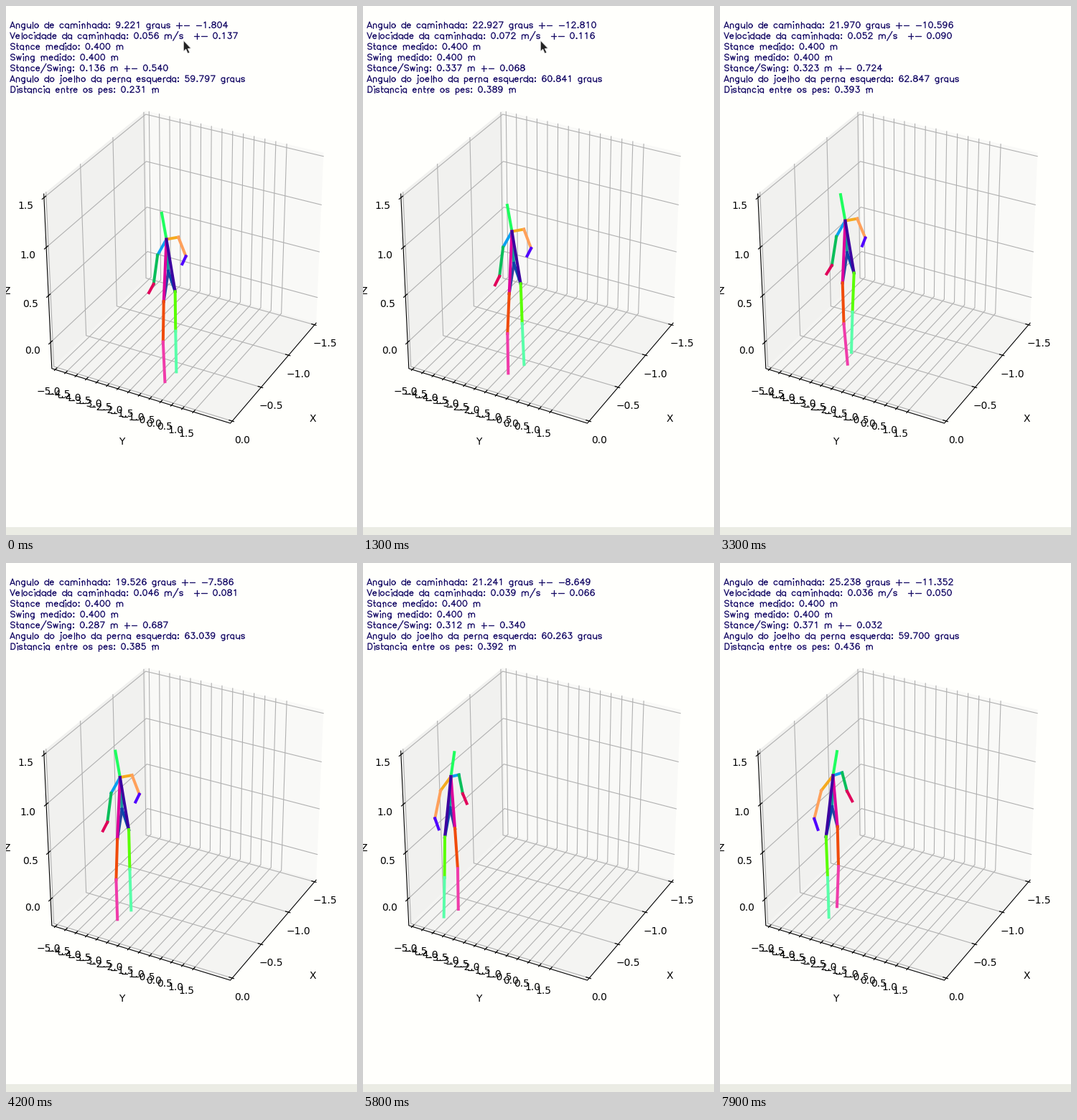
Write a matplotlib script that moves like this. It is 489x738 px and loops after 8 s.

```python
import numpy as np
import matplotlib.pyplot as plt
from matplotlib.animation import FuncAnimation
from matplotlib.collections import LineCollection
from matplotlib.patches import Polygon, Rectangle

W, H, DPI = 489, 738, 64
STEP = 100
COUNT = 80


def px(n):
    """Pixels to points."""
    return n * 72 / DPI


plt.rcParams["font.family"] = "DejaVu Sans"
fig = plt.figure(figsize=(W / DPI, H / DPI), dpi=DPI, facecolor="#fffffc")
ax = fig.add_axes([0, 0, 1, 1])
ax.set_xlim(-0.5, W - 0.5)
ax.set_ylim(H - 0.5, -0.5)
ax.axis("off")

# ---------------------------------------------------------------- 3D box
AZIM, ELEV, DIST = np.radians(27.7), np.radians(31), 9.5
CA, SA, CE, SE = np.cos(AZIM), np.sin(AZIM), np.cos(ELEV), np.sin(ELEV)
VIEW = np.array([[-SA, CA, 0], [-SE * CA, -SE * SA, CE], [CE * CA, CE * SA, SE]])
LOW = np.array([-1.5, -5, -0.25])
HIGH = np.array([0, 3, 1.5])
PAD = (HIGH - LOW) / 48
X0, Y0, Z0 = LOW - PAD
X1, Y1, Z1 = HIGH + PAD


def project(x, y, z):
    unit = (np.array([x, y, z]) - LOW) / (HIGH - LOW) - 0.5
    right, up, near = VIEW @ unit
    scale = 2557 / (DIST - near)
    return 251 + scale * right, 356 - scale * up


def path3(points, **style):
    ax.plot(*zip(*[project(*p) for p in points]), **style)


def label(x, y, text):
    ax.text(x, y + 5, text, fontsize=px(13.89), ha="center", va="baseline")


def pane(color, *corners):
    ax.add_patch(Polygon([project(*c) for c in corners], fc=color, ec="none"))


def ticks(values, grid, mark, offset):
    """Grid line, tick mark and label for each value of one axis."""
    for v in values:
        path3(grid(v), color="#b0b0b0", lw=px(1.1), zorder=2)
        path3(mark(v), color="black", lw=px(1.2), zorder=3)
        x, y = project(*mark(v)[1])
        label(x + offset[0], y + offset[1], f"{v:.1f}".replace("-", "\u2212"))


pane("#f1f1ef", (X0, Y0, Z0), (X1, Y0, Z0), (X1, Y0, Z1), (X0, Y0, Z1))
pane("#f9f9f7", (X0, Y0, Z0), (X0, Y1, Z0), (X0, Y1, Z1), (X0, Y0, Z1))
pane("#f4f4f2", (X0, Y0, Z0), (X1, Y0, Z0), (X1, Y1, Z0), (X0, Y1, Z0))

DX, DY = (X1 - X0) / 60, (Y1 - Y0) / 60
ticks(np.arange(-1.5, 0.1, 0.5),
      lambda v: [(v, Y0, Z1), (v, Y0, Z0), (v, Y1, Z0)],
      lambda v: [(v, Y1 - DY, Z0), (v, Y1, Z0), (v, Y1 + DY / 2, Z0)],
      (14, 25.5))
ticks(np.arange(-5, 1.6, 0.5),
      lambda v: [(X0, v, Z1), (X0, v, Z0), (X1, v, Z0)],
      lambda v: [(X1 - DX, v, Z0), (X1, v, Z0), (X1 + DX / 2, v, Z0)],
      (-9.5, 29.5))
ticks(np.arange(0, 1.6, 0.5),
      lambda v: [(X1, Y0, v), (X0, Y0, v), (X0, Y1, v)],
      lambda v: [(X1 - DX, Y0, v), (X1, Y0, v), (X1 + DX, Y0, v)],
      (-25.5, 10.5))
path3([(X1, Y0, Z1), (X1, Y0, Z0), (X1, Y1, Z0), (X0, Y1, Z0)],
      color="black", lw=px(1.1), zorder=3)
label(427, 575, "X")
label(161, 606, "Y")
label(1, 396, "Z")
ax.add_patch(Rectangle((-1, 726.5), W + 2, 13, fc="#ebece4", ec="none"))

# ---------------------------------------------------------------- stroke font
CAP, MID = 21, 14  # heights of capitals and of small letters


def line(*xy):
    return np.array(xy, float).reshape(-1, 2)


def stem(x, top=MID, bottom=0):
    return line(x, top, x, bottom)


def arc(cx, cy, rx, ry, a0=0, a1=360):
    a = np.radians(np.linspace(a0, a1, 17))
    return np.column_stack([cx + rx * np.cos(a), cy + ry * np.sin(a)])


def join(*parts):
    return np.vstack(parts)


def dot(x, y):
    return arc(x, y, 1, 1)


def turned(stroke, width, height):
    """The stroke after half a turn inside its box."""
    return [width, height] - stroke


BOWL = arc(9.5, 7, 6.5, 7, 35, 325)
ARCH = join(arc(9.5, 8.5, 5.5, 5.5, 165, 0), line(15, 0))
ESS = join(arc(8.5, 10.5, 5.5, 3.5, 15, 250), arc(8.5, 3.5, 5.5, 3.5, 70, -165))
BAR = line(4, 9, 22, 9)
SIX = [arc(10.5, 6.5, 6.5, 6.5), arc(11, 10, 7, 11, 45, 197)]

GLYPHS = {
    "a": [stem(15), BOWL],
    "c": [BOWL],
    "d": [stem(15, CAP), BOWL],
    "e": [join(line(3, 8), arc(9, 7, 6, 7, 10, 325))],
    "g": [join(stem(15, MID, -2), arc(9.5, -1, 5.5, 6, 0, -130)), BOWL],
    "h": [stem(4, CAP), ARCH],
    "i": [stem(4), dot(4, CAP)],
    "j": [join(stem(6, MID, -3), arc(2, -3, 4, 4, 0, -100)), dot(6, CAP)],
    "l": [stem(4, CAP)],
    "m": [stem(4), ARCH, ARCH + [11, 0]],
    "n": [stem(4), ARCH],
    "o": [arc(9.5, 7, 6.5, 7)],
    "p": [stem(4, MID, -7), turned(BOWL, 19, MID)],
    "q": [stem(15, MID, -7), BOWL],
    "r": [stem(4), arc(11, 8, 7, 6, 180, 80)],
    "s": [ESS],
    "t": [join(stem(5, CAP, 4), arc(9, 4, 4, 4, 180, 285)), line(2, MID, 9, MID)],
    "u": [stem(15), turned(ARCH, 19, MID)],
    "w": [line(3, MID, 7, 0, 11, MID, 15, 0, 19, MID)],
    "A": [line(1, 0, 9, CAP, 17, 0), line(4, 7, 14, 7)],
    "D": [join(stem(4, 0, CAP), arc(11, 10.5, 7, 10.5, 90, -90), line(4, 0))],
    "S": [ESS * [1.27, 1.5] - [0.8, 0]],
    "V": [line(1, CAP, 9, 0, 17, CAP)],
    " ": [],
    ".": [dot(5, 1)],
    ":": [dot(5, 1), dot(5, 13)],
    "/": [line(20, 25, 2, -7)],
    "-": [BAR],
    "+": [BAR, stem(13, 18)],
    "0": [arc(10, 10.5, 7, 10.5)],
    "1": [join(line(6, 17), stem(11, CAP))],
    "2": [join(arc(10, 15.5, 6, 5.5, 180, -25), line(3, 0, 17, 0))],
    "3": [join(line(5, CAP, 16, CAP), arc(10, 6.5, 7, 6.5, 90, -157))],
    "4": [join(stem(13, 0, CAP), line(3, 7, 18, 7))],
    "5": [join(line(15, CAP, 5, CAP), arc(10, 7, 7, 7, 135, -155))],
    "6": SIX,
    "7": [line(3, CAP, 17, CAP, 7, 0)],
    "8": [arc(10, 16.5, 6, 4.5), arc(10, 6, 7, 6)],
    "9": [turned(s, 20, CAP) for s in SIX],
}
WIDTHS = {8: "il", 10: ".:j", 12: "t", 13: "r", 16: " ", 17: "s", 18: "AVce",
          20: "S0123456789", 21: "D", 22: "w/", 26: "+-", 30: "m"}
ADVANCE = {ch: width for width, chars in WIDTHS.items() for ch in chars}


def strokes(text, x, y, scale=0.4):
    out = []
    for ch in text:
        out += [s * [scale, -scale] + [x, y] for s in GLYPHS[ch]]
        x += ADVANCE.get(ch, 19) * scale
    return out


# ---------------------------------------------------------------- readings
MARKS = [0, 1300, 2100, 3300, 4800, 6700, 7900]


def report_lines(t):
    def at(*values):
        return np.interp(t, MARKS, values)

    angle = at(9.221, 22.927, 5.346, 21.970, 17.896, 24.252, 25.238)
    spread = at(-1.804, -12.810, 4.829, -10.596, -5.580, -11.412, -11.352)
    speed = at(0.056, 0.072, 0.039, 0.052, 0.042, 0.037, 0.036)
    ratio_spread = at(0.540, 0.068, 0.480, 0.724, 0.663, 0.050, 0.032)
    knee = at(59.797, 60.841, 63.743, 62.847, 63.167, 57.650, 59.700)
    feet = at(0.231, 0.389, 0.242, 0.393, 0.380, 0.402, 0.436)
    speed_spread = 0.137 * np.exp(-t / 7900)
    ratio = 0.0147 * angle
    return (
        f"Angulo de caminhada: {angle:.3f} graus +- {spread:.3f}",
        f"Velocidade da caminhada: {speed:.3f} m/s  +- {speed_spread:.3f}",
        "Stance medido: 0.400 m",
        "Swing medido: 0.400 m",
        f"Stance/Swing: {ratio:.3f} m +- {ratio_spread:.3f}",
        f"Angulo do joelho da perna esquerda: {knee:.3f} graus",
        f"Distancia entre os pes: {feet:.3f} m",
    )


# ---------------------------------------------------------------- walker
# Screen directions of the body, and joints as (down, ahead, sideways).
DOWN = np.array([0.015, 1])
AHEAD = np.array([-1, -0.25])
SIDE = np.array([14.5, -12.5])
HEAD, BELLY = (-35, 6, 0), (44, -2, 0)
ARM = [(9, -2, 1), (42, -4, 1.55), (55, 2, 1.6)]
LEG = [(79, -3, 0.55), (135, -2, 0.6), (191, -3, 0.55)]
STRIDE, PERIOD = 6, 1420


def neck_at(t):
    x = np.interp(t, MARKS[:5] + [5800, 6700, 7300, 7900],
                  [223, 207, 200, 174, 148, 122, 129, 122, 157])
    y = np.interp(t, [0, 1300, 1600, 2100, 7900], [325, 314, 321, 300, 296])
    return np.array([x, y])


def facing(t):
    """1 while walking away to the left, -1 after turning round."""
    u = np.clip((t - 5200) / 800, 0, 1)
    return np.cos(np.pi * u * u * (3 - 2 * u))


def skeleton(t):
    """Paths of trunk and limbs, in drawing order."""
    neck, way = neck_at(t), facing(t)
    swing = -STRIDE * np.sin(2 * np.pi * t / PERIOD)

    def joint(spec, hand=0, push=0):
        down, ahead, side = spec
        return (neck + down * DOWN + (way * ahead + push) * AHEAD
                + way * hand * side * SIDE)

    belly = joint(BELLY)
    arms, legs = [], []
    for hand in (-1, 1):
        step = -hand * swing
        arms.append([neck] + [joint(s, hand, -0.15 * step * i)
                              for i, s in enumerate(ARM)])
        legs.append([neck] + [joint(s, hand, 0.5 * step * i)
                              for i, s in enumerate(LEG)])
    spine = [[neck, belly]] + [[belly, leg[1]] for leg in legs]
    return spine + [[neck, joint(HEAD)]] + arms + legs


COLORS = (
    "#149a9a", "#2846a0", "#0a46aa", "#1eff5f",
    "#0aa0f0", "#0abe5a", "#e1005a",
    "#f5aa1e", "#ffa05a", "#5000ff",
    "#dc009b", "#f04b0a", "#f03caa",
    "#3c00a0", "#5aff00", "#5affaa",
)
bones = LineCollection([], colors=COLORS, linewidths=px(4),
                       capstyle="projecting", zorder=5)
report = LineCollection([], colors="#150a66", linewidths=px(1.3),
                        capstyle="round", joinstyle="round", zorder=6)
ax.add_collection(bones, autolim=False)
ax.add_collection(report, autolim=False)

ARROW = line(0, 0, 0, 14.5, 3.2, 11.5, 5.8, 17.5, 8.2, 16.4, 5.6, 10.8, 10, 10.5)
pointer = ax.add_patch(Polygon(ARROW, fc="#222222", ec="#dcdcdc",
                               lw=px(0.6), zorder=7))

# Steps in which the picture stands still
HOLDS = {3, 5, 6, 10, 12, 19, 22, 25, 26, 29, 34, 37, 40, 41, 45, 49, 51, 55,
         59, 68, 70, 74, 78}


def update(n):
    while n in HOLDS:
        n -= 1
    t = n * STEP
    bones.set_segments([pair for path in skeleton(t)
                        for pair in zip(path, path[1:])])
    report.set_segments([s for row, text in enumerate(report_lines(t))
                         for s in strokes(text, 5, 30 + 15 * row)])

    # The pointer rests, then leaves towards the top.
    away = max(0, n - 14)
    pointer.set_visible(n < 18)
    pointer.set_xy(ARROW + [247 + 5 * away, 48 - 13 * away])
    return bones, report, pointer


anim = FuncAnimation(fig, update, frames=COUNT, interval=STEP, repeat=True,
                     repeat_delay=0, blit=False)
plt.show()
```
